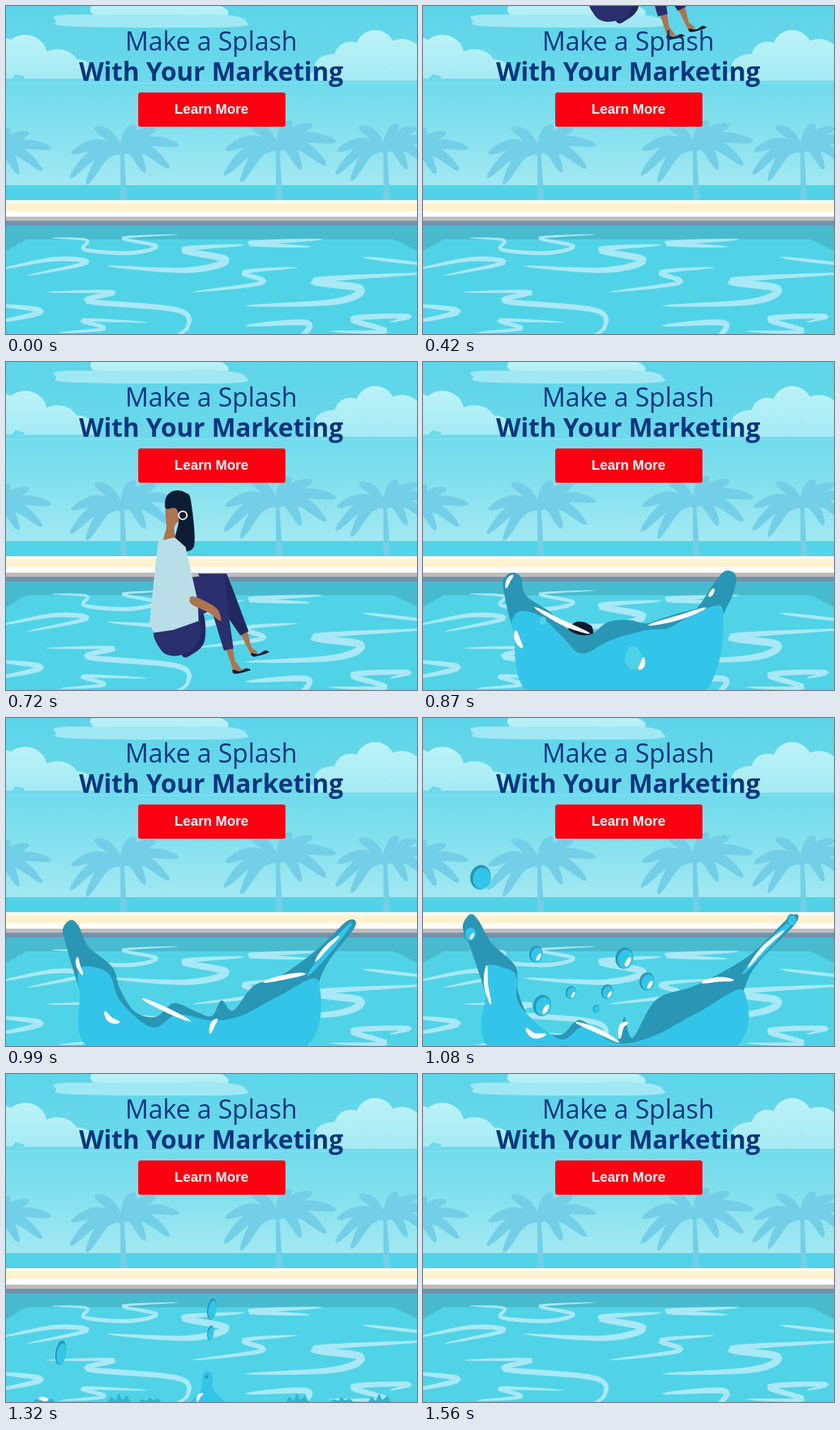
Animation, 600 px wide and 478 px high, one loop 1590 ms. Source, as an HTML page with a canvas:

```html
<!DOCTYPE html>
<html lang="en">
<head>
<meta charset="utf-8">
<title>Make a Splash</title>
<style>
html, body { margin: 0; width: 100%; height: 100%; overflow: hidden; }
canvas, svg { position: absolute; left: 0; top: 0; width: 600px; height: 478px; }
text { text-anchor: middle; fill: #02357f; font-family: "Open Sans", sans-serif; }
.button { fill: #fff; font: bold 20px "Liberation Sans", Arial, sans-serif; }
</style>
</head>
<body>
<canvas id="stage" width="600" height="478"></canvas>
<svg viewBox="0 0 600 478">
  <text x="299.5" y="65" font-size="37.7">Make a Splash</text>
  <text x="299.5" y="109" font-size="37.3" font-weight="700">With Your Marketing</text>
  <rect x="193" y="126" width="215" height="50" rx="3.5" fill="#fb0010"/>
  <text x="300" y="157" class="button">Learn More</text>
</svg>
<script>
const W = 600, H = 478, LOOP = 1590;
const DARK = '#2a96b5', BLUE = '#33c5e9', POOL = '#51d3e7';
const NAVY = '#2a2f6d', SHADE = '#22285f', SKIN = '#ad7450', INK = '#0b1c33';
const stage = document.getElementById('stage').getContext('2d');
let c = stage;

const clamp = (v, lo = 0, hi = 1) => Math.min(hi, Math.max(lo, v));

// Catmull-Rom samples through a flat list of coordinates
function spline(p, closed) {
  const n = p.length / 2, out = [];
  const at = (i, k) => p[2 * (closed ? (i + n) % n : clamp(i, 0, n - 1)) + k];
  for (let i = 0; i < (closed ? n : n - 1); i++)
    for (let t = 0; t < 1; t += 1 / 8)
      out.push([0, 1].map(k => {
        const a = at(i - 1, k), b = at(i, k), d = at(i + 1, k), e = at(i + 2, k);
        return b + t / 2 * (d - a + t * (2 * a - 5 * b + 4 * d - e + t * (3 * (b - d) + e - a)));
      }));
  if (!closed) out.push(p.slice(-2));
  return out;
}

function fill(color, points) {
  c.fillStyle = color;
  c.beginPath();
  points.forEach(q => c.lineTo(q[0], q[1]));
  c.fill();
}

const blob = (color, ...p) => fill(color, spline(p, true));
const poly = (color, ...p) => fill(color, p.flatMap((v, i) => i % 2 ? [] : [[v, p[i + 1]]]));

// Stroke that tapers at both ends
function ribbon(color, width, ...p) {
  const mid = spline(p), last = mid.length - 1, left = [], right = [];
  mid.forEach(([x, y], i) => {
    const a = mid[Math.max(0, i - 1)], b = mid[Math.min(last, i + 1)];
    const dx = b[0] - a[0], dy = b[1] - a[1];
    const k = width / 2 * Math.sin(Math.PI * i / last) ** .6 / (Math.hypot(dx, dy) || 1);
    left.push([x - dy * k, y + dx * k]);
    right.unshift([x + dy * k, y - dx * k]);
  });
  fill(color, left.concat(right));
}

function oval(color, x, y, rx, ry = rx, turn = 0) {
  c.fillStyle = color;
  c.beginPath();
  c.ellipse(x, y, rx, ry, turn, 0, 7);
  c.fill();
}

function band(color, y, h) {
  c.fillStyle = color;
  c.fillRect(0, y, W, h);
}

function fade(y0, y1, ...colors) {
  const g = c.createLinearGradient(0, y0, 0, y1);
  colors.forEach((color, i) => g.addColorStop(i / (colors.length - 1), color));
  return g;
}

// Puffs standing on a flat base
function cloud(base, top, ...puffs) {
  c.save();
  c.beginPath();
  c.rect(0, 0, W, base);
  c.clip();
  const paint = fade(top, base, '#bbf2f7', '#a5eaf4');
  puffs.forEach(puff => oval(paint, ...puff));
  c.restore();
}

const leaves = [[-76, 40], [-52, 50], [-74, 4], [-40, -34], [20, -38], [50, -32], [84, -8], [70, 26], [34, 32]];
function palm(x, y, size) {
  const color = '#73cfe7';
  poly(color, x - 2, y, x + 3, y, x + 8, 284, x - 2, 284);
  for (const [dx, dy] of leaves) {
    const tx = dx * size, ty = dy * size;
    ribbon(color, 15 * size, x, y, x + tx * .5, y + ty * .35 - 11 * size, x + tx, y + ty);
  }
  oval(color, x, y, 7);
}

const wave = (width, ...p) => ribbon('#a9e8f6', width, ...p);

function drawWaves() {
  wave(6, 66, 338, 118, 341, 115, 355, 180, 360, 220, 350, 170, 338, 252, 333);
  wave(7, -10, 384, 70, 369, 118, 374, 30, 393);
  wave(10, 146, 379, 265, 385, 322, 370, 258, 355, 350, 348);
  wave(7, 464, 340, 354, 346, 446, 351);
  wave(7, 271, 417, 375, 403, 347, 388, 426, 381);
  wave(11, 348, 437, 480, 431, 518, 412, 450, 400, 620, 389);
  wave(5, 520, 366, 625, 378);
  wave(8, 58, 417, 158, 417, 119, 430, 250, 443, 265, 468, 238, 486);
  wave(8, -20, 435, 52, 445, -20, 462);
  wave(6, 77, 476, 144, 470, 112, 458, 208, 461);
  wave(9, 348, 466, 440, 462, 425, 488);
  wave(8, 470, 474, 555, 474, 505, 456, 588, 452, 560, 461);
}

function drawScene() {
  band(fade(0, 262, '#5dd4e9', '#68d8ea', '#83e0ed', '#a3e9f2'), 0, 262);
  band('#8be2ee', 112, 1);
  cloud(27, 0, [215, 5, 92, 24], [285, 10, 40, 14]);
  blob('#a0e8f3', 73, 21, 84, 13, 210, 13, 320, 13, 350, 22, 325, 31, 100, 30);
  cloud(106, 42, [28, 72, 32, 30], [-4, 78, 24, 32], [75, 86, 30, 23], [105, 94, 22, 16], [80, 104, 54, 10]);
  cloud(109, 35, [478, 90, 28, 20], [503, 76, 24], [539, 64, 29], [578, 74, 30, 26], [530, 102, 90, 13]);
  band(POOL, 261, 217);
  palm(-14, 215, .96);
  palm(169, 211, 1);
  palm(396, 206, 1.03);
  palm(553, 208, .95);
  band('#fffdf0', 283, 4);
  band('#fff2d0', 287, 13);
  band('#fff', 299, 8);
  band('#bfbcba', 307, 6);
  band('#6e94b1', 313, 7);
  band(POOL, 320, 158);
  poly('#49bbcf', 0, 320, W, 320, W, 357, 566, 340, 30, 340, 0, 357);
  drawWaves();
}

function drawWoman(n) {
  const m = n - 17, swing = Math.max(0, -m);
  c.save();
  c.translate(m * (m < 0 ? -1.8 : -5.3), m * (m < 0 ? 52.4 : 47.8));
  c.save();
  c.translate(swing, swing * 2.8);
  poly(SKIN, 358, 252, 368, 248, 374, 272, 384, 280, 374, 284);
  blob(INK, 374, 281, 385, 282, 394, 277, 399, 280, 378, 286);
  poly(SHADE, 296, 165, 338, 165, 348, 190, 370, 249, 358, 255);
  c.restore();
  blob(SHADE, 270, 215, 302, 220, 306, 262, 290, 281, 272, 282);
  blob(NAVY, 234, 244, 290, 215, 300, 250, 288, 276, 262, 285, 242, 276);
  poly(SKIN, 336, 272, 347, 272, 350, 292, 361, 306, 348, 307);
  blob(INK, 347, 305, 357, 307, 367, 303, 372, 306, 350, 311);
  poly(NAVY, 270, 172, 334, 165, 343, 240, 348, 274, 334, 277, 316, 218, 280, 235);
  blob(SKIN, 249, 68, 262, 62, 278, 76, 262, 96, 263, 118, 246, 118, 250, 97);
  blob(INK, 249, 70, 250, 53, 262, 44, 278, 47, 286, 60, 290, 126, 262, 126, 268, 88, 264, 70);
  poly('#b9dee8', 238, 118, 262, 112, 278, 126, 296, 206, 297, 234, 260, 247, 232, 251, 225, 238);
  blob(SKIN, 288, 198, 314, 209, 326, 219, 329, 234, 312, 222, 286, 209);
  c.strokeStyle = '#fff';
  c.lineWidth = 2;
  c.beginPath();
  c.arc(274, 80, 6, 0, 7);
  c.stroke();
  c.restore();
}

const outerRisen = [172, 490, 133, 395, 117, 328, 121, 312, 132, 307, 143, 314, 150, 340, 185, 364,
  207, 386, 226, 397, 247, 396, 270, 379, 300, 376, 325, 381, 345, 375, 370, 367,
  392, 361, 403, 355, 428, 318, 443, 304, 457, 312, 452, 340, 436, 375, 397, 490];
const outerBroken = [118, 490, 91, 400, 66, 326, 58, 303, 69, 286, 81, 295, 100, 328, 135, 362,
  139, 400, 162, 448, 200, 462, 228, 440, 262, 462, 284, 470, 294, 436, 306, 466,
  341, 410, 402, 388, 478, 345, 535, 290, 545, 298, 488, 358, 467, 400, 435, 490];
const innerRisen = [168, 490, 132, 395, 133, 370, 148, 363, 175, 373, 205, 402, 232, 425,
  275, 405, 325, 391, 358, 388, 390, 371, 438, 362, 397, 490];
const innerBroken = [118, 490, 91, 400, 92, 362, 118, 364, 136, 376, 142, 420, 200, 468,
  235, 450, 283, 474, 335, 464, 400, 430, 468, 397, 435, 490];

function drawSplash(n) {
  const rise = Math.sin(Math.PI / 2 * clamp((n - 20) / 4));
  const open = clamp((n - 24) / 5), sink = clamp((n - 29) / 6);
  const height = rise * (1 - sink) ** 1.3, up = v => H - v * height;
  const pose = (from, to) => from.map((v, i) => {
    const p = v + (to[i] - v) * open;
    return i % 2 ? up(H - p) : 300 + (p - 300) * (1 + sink * .25);
  });
  const glint = (width, from, to) => ribbon('#fff', width * (1 - sink * .5), ...pose(from, to));

  blob(DARK, ...pose(outerRisen, outerBroken));
  blob(BLUE, ...pose(innerRisen, innerBroken));
  if (open > .5) ribbon(BLUE, 9, ...pose([400, 380, 425, 345, 445, 310], [466, 374, 505, 330, 545, 290]));
  if (open < .5) {
    oval('#4fd2e7', 307, up(47), 12, 17 * height);
    oval('#4fd2e7', 175, up(101), 5, 6);
  }
  glint(7, [162, 357, 204, 380, 244, 396], [222, 443, 255, 456, 287, 473]);
  glint(7, [328, 384, 375, 372, 414, 358], [406, 386, 430, 381, 454, 382]);
  glint(6, [121, 330, 125, 318, 132, 310], [93, 360, 92, 388, 99, 418]);
  glint(6, [417, 342, 421, 337, 425, 330], [474, 364, 498, 334, 528, 309]);
  glint(8, [135, 391, 138, 405, 145, 417], [150, 452, 162, 463, 180, 461]);
  glint(7, [314, 448, 320, 442, 322, 430], [287, 468, 290, 449, 300, 444]);
}

// x, y, radius, sideways speed, upward speed
const drops = [
  [84, 232, 15, -.6, 106], [294, 350, 13, .9, 132], [269, 399, 9, 4.2, 134],
  [174, 419, 13, -3, 92], [216, 400, 8, -2, 90], [253, 424, 5, 1, 85], [165, 344, 10, -4, 95],
  [327, 384, 11, 2, 90], [538, 294, 7, 8, 80], [68, 314, 9, -5, 85]
];

function drawDrops(n) {
  const m = n - 29;
  if (m < -1) return;
  for (const [x0, y0, r, vx, vy] of drops) {
    const x = x0 + vx * m, y = y0 - vy * m + 18.7 * m * m;
    const rx = r * (1 - .07 * clamp(m, 0, 8)), ry = r * 1.2;
    oval(DARK, x, y, rx, ry, .15);
    oval(BLUE, x + rx * .14, y + ry * .1, rx * .86, ry * .88, .15);
    if (m < 5 && r > 7 && r < 14) oval('#fff', x + rx * .4, y + ry * .35, rx * .25, ry * .5, .5);
  }
}

function drawRipples(n) {
  const lift = 1 - ((n - 37.3) / 3.7) ** 2;
  if (lift <= 0) return;
  const y = v => H - v * lift;
  if (n < 40) {
    [55, 165, 210, 425, 490, 545].forEach((x, i) => {
      const h = i % 2 ? 15 : 8;
      poly('#2fb4d4', x - 16, H, x - 12, y(h * .6), x - 5, y(2), x, y(h), x + 4, y(3), x + 12, y(h * .7), x + 17, H);
    });
    oval('#fff', 55, y(5), 7, 3, .2);
  }
  blob(BLUE, 270, 482, 284, y(18), 287, y(44), 294, y(52), 301, y(44), 303, y(20), 320, 482);
  oval(DARK, 293, y(42), 2.5);
  ribbon('#fff', 5, 279, H, 282, y(10), 288, y(14));
}

const backdrop = document.createElement('canvas');
backdrop.width = W;
backdrop.height = H;
c = backdrop.getContext('2d');
drawScene();
c = stage;

function draw(now) {
  // Four poses per 150 ms on a 30 ms grid
  const tick = Math.floor(now % LOOP / 30), n = tick - Math.floor(tick / 5);
  c.drawImage(backdrop, 0, 0);
  if (n >= 12 && n <= 24) drawWoman(n);
  if (n > 20 && n < 35) drawSplash(n);
  drawDrops(n);
  drawRipples(n);
  requestAnimationFrame(draw);
}
requestAnimationFrame(draw);
</script>
</body>
</html>
```
